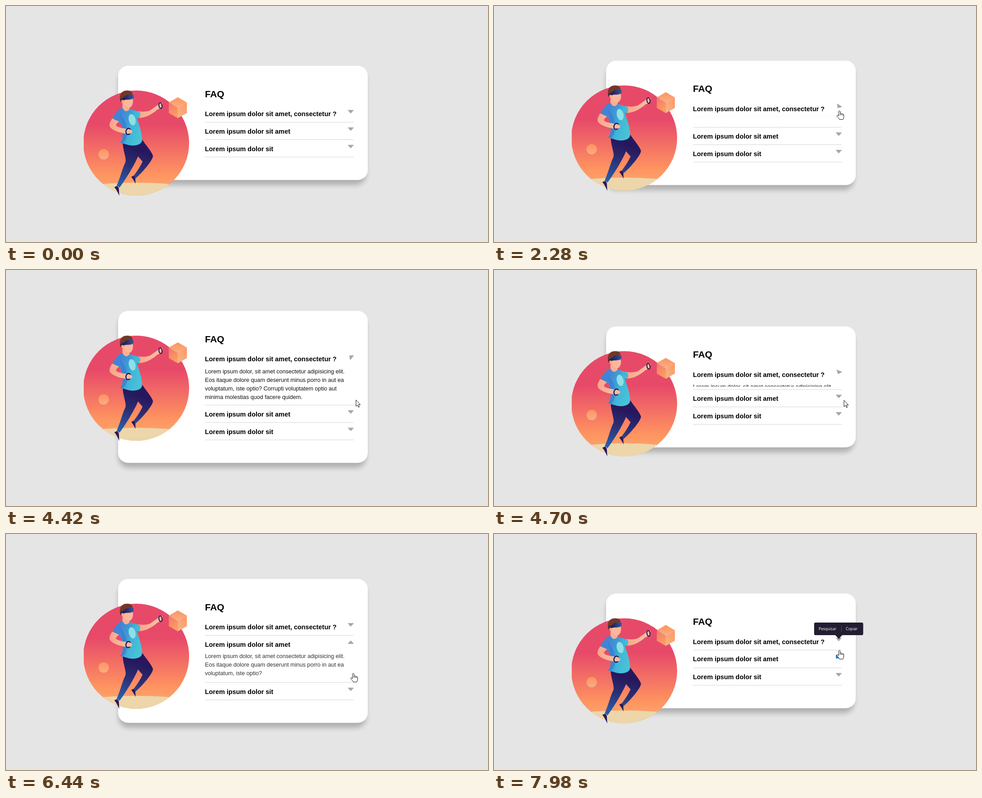
Recreate the animation shown at these times as an HTML page. Size 1066 by 525 pixels, loop 8000 ms.

```html
<!DOCTYPE html>
<html lang="en">
<head>
<meta charset="utf-8">
<title>FAQ card</title>
<style>
html, body { margin: 0; width: 100%; height: 100%; overflow: hidden; background: #e5e5e5; }
svg { display: block; width: 100%; height: 100%; }
text { font-family: "Liberation Sans", Arial, sans-serif; }
.head { font-size: 20.8px; font-weight: 700; }
.title { font-size: 14.4px; font-weight: 700; }
.answer { font-size: 12.6px; fill: #111; }
.tip text { font-family: "Open Sans", "Noto Sans", sans-serif; font-size: 8.6px; fill: #fff; }
.caret { fill: #a7a7a7; stroke: #a7a7a7; stroke-linejoin: round; }
.cursor { fill: #fff; stroke: #111; stroke-linejoin: round; }
</style>
</head>
<body>
<svg viewBox="0 0 1066 525">
  <defs>
    <linearGradient id="sky" x1="0" y1="0" x2="0" y2="1">
      <stop offset=".33" stop-color="#e74a69"/><stop offset=".8" stop-color="#ff9560"/><stop offset="1" stop-color="#f8ad78"/>
    </linearGradient>
    <linearGradient id="shirt" gradientUnits="userSpaceOnUse" x1="246" y1="262" x2="298" y2="276">
      <stop offset="0" stop-color="#4283d3"/><stop offset=".42" stop-color="#3e9ed5"/><stop offset=".6" stop-color="#3fb5d8"/><stop offset="1" stop-color="#48c2d7"/>
    </linearGradient>
    <linearGradient id="pants" gradientUnits="userSpaceOnUse" x1="290" y1="310" x2="258" y2="398">
      <stop offset=".1" stop-color="#27185d"/><stop offset=".5" stop-color="#2b2f73"/><stop offset="1" stop-color="#2a5ca9"/>
    </linearGradient>
    <linearGradient id="skin" x1="0" y1="0" x2="1" y2="0">
      <stop offset="0" stop-color="#fba589"/><stop offset="1" stop-color="#f9c4a5"/>
    </linearGradient>
    <linearGradient id="visor" x1="0" y1="0" x2="1" y2="0">
      <stop offset="0" stop-color="#29245f"/><stop offset="1" stop-color="#3058a2"/>
    </linearGradient>
    <linearGradient id="left" x1="0" y1="0" x2=".4" y2="1">
      <stop offset="0" stop-color="#ec786b"/><stop offset="1" stop-color="#ff9d60"/>
    </linearGradient>
    <linearGradient id="right" x1="1" y1="0" x2="0" y2="1">
      <stop offset="0" stop-color="#ff965f"/><stop offset="1" stop-color="#f6b58a"/>
    </linearGradient>
    <linearGradient id="top" x1="0" y1="0" x2="0" y2="1">
      <stop offset="0" stop-color="#ff945f"/><stop offset="1" stop-color="#f7ae85"/>
    </linearGradient>
    <clipPath id="disc"><circle cx="288" cy="305" r="117"/></clipPath>
    <clipPath id="edge"><rect x="172" y="180" width="260" height="250"/></clipPath>
    <filter id="blur" filterUnits="userSpaceOnUse" x="190" y="40" width="670" height="470"><feGaussianBlur stdDeviation="6"/></filter>
  </defs>

  <rect width="1066" height="525" fill="#e5e5e5"/>
  <rect id="shade" x="249" width="547" rx="22" opacity=".23" filter="url(#blur)"/>
  <rect id="card" x="248" width="552" rx="22" fill="#fff"/>

  <g id="art">
    <g clip-path="url(#edge)">
      <circle cx="288" cy="305" r="117" fill="url(#sky)"/>
      <ellipse cx="288" cy="420" rx="160" ry="27" fill="#ecd6aa" clip-path="url(#disc)"/>
    </g>
    <circle cx="216" cy="330" r="11.5" fill="url(#top)"/>
    <path d="M380 203L400 214.500 380 226 360 214.500Z" fill="url(#top)"/>
    <path d="M360 214.500L380 226V249.500L360 238Z" fill="url(#left)"/>
    <path d="M400 214.500L380 226V249.500L400 238Z" fill="url(#right)"/>

    <!-- legs -->
    <path d="M289 303L301 297C309 309 321 322 325 333C326 342 301 371 287 383L281 379C290 369 299 353 302 346L289 331Z" fill="url(#pants)"/>
    <path d="M258 303L299 300C299 314 295 328 290 339C281 359 262 390 251 404L245 399C252 384 258 359 264 348C267 338 259 325 258 303Z" fill="url(#pants)"/>
    <path d="M239.500 403L246 400 249.500 405 250.500 422C248 417 245 409 239.500 403ZM277 380L282 377.500 286 382 286.500 395.500C284 390 281 385 277 380Z" fill="#27185d"/>

    <!-- far arm -->
    <path d="M291 234C303 236 313 235 319 232L336 220C339 216 344 213 346 217L346 223C343 228 338 228 334 231C323 241 308 249 294 249Z" fill="url(#skin)"/>
    <ellipse cx="341.700" cy="221.500" rx="3.400" ry="6.400" fill="none" stroke="#27185d" stroke-width="2.200" transform="rotate(-10 342 222)"/>

    <!-- torso -->
    <path d="M258 214L257 232Q265 239 273 230L274 220Z" fill="#faae94"/>
    <path d="M258 227Q264 240 274 229L296 236Q298 243 295 250L289 248C295 267 302 285 301 299C300 306 293 310 280 310.500C270 310 264 307 252 304Q259 298 258 284L256 263 235 251C240 241 248 228 258 227Z" fill="url(#shirt)"/>
    <path d="M252 241C262 253 268 262 268 284C267 296 262 303 257 305L252 304Q259 298 258 284L256 263Z" fill="#387bce" opacity=".65"/>
    <ellipse cx="279" cy="253" rx="7.500" ry="12.800" fill="#8de0e5" transform="rotate(-13 279 253)"/>

    <!-- near arm -->
    <path d="M235 250L250 257C245 261 242 264 244 267C250 271 260 272 267 273Q275 272 278 278Q277 285 269 285C253 282 236 278 230 269C227 264 231 256 235 250Z" fill="url(#skin)"/>
    <ellipse cx="270.500" cy="279" rx="5.200" ry="6.800" fill="none" stroke="#27185d" stroke-width="2.600" transform="rotate(15 270.500 279)"/>
    <path d="M270 277Q274 272 278 277T274 284Q270 283 270 277Z" fill="#fab99c"/>

    <!-- head -->
    <path d="M257 205L279 201 281 211Q281 222 274 226Q266 228 260 217Z" fill="#fbb79b"/>
    <path d="M253 213C249 200 254 187 269 188Q279 188 280 196L268 199 261 208 256 212Z" fill="#6f3928"/>
    <path d="M253 207L264 201 266 208 257 211 255 214Z" fill="#27205c"/>
    <path d="M264 199L280 196.500Q283 198 282 205Q277 209 265 208.500Z" fill="url(#visor)"/>
    <path d="M255 210Q259 207 260 211T258 217Q255 215 255 210Z" fill="#fba589"/>
  </g>

  <text id="head" class="head" x="440">FAQ</text>
  <g id="items"></g>

  <g id="tip" class="tip">
    <path fill="#231d32" d="M711 197H813.500a3 3 0 0 1 3 3V222a3 3 0 0 1-3 3H770L762.500 233.500 755 225H711a3 3 0 0 1-3-3V200a3 3 0 0 1 3-3Z"/>
    <text x="718" y="214">Pesquisar</text>
    <text x="778" y="214">Copiar</text>
    <path d="M768.500 205.500V217" stroke="#5b556a"/>
  </g>

  <circle id="press" r="11" fill="#ffff75" style="mix-blend-mode:multiply"/>
  <path id="hand" class="cursor" d="M-2.700 1Q-1-1.800.7 1V6.200Q2.500 4.500 3.600 6.600Q5.500 5.300 6.300 7.600Q8.600 7 8.600 9.500V13Q8.300 16 6.800 19.300H-.8Q-2 16.500-6 12.300Q-7.500 10-5.600 9.400Q-4 9.300-2.700 11.500ZM.7 6V10M3.600 7V10M6.300 8V10"/>
  <path id="arrow" class="cursor" d="M0 0V14.300L3.200 11.400 5.500 16.500 7.600 15.600 5.400 10.600H9.800Z"/>
</svg>
<script>
const LOOP = 8000, PITCH = 38.75, OPEN_MS = 700, FADE_MS = 1000, MAX_H = 130;
const $ = id => document.getElementById(id);

function make(tag, parent, attrs, text) {
  const el = document.createElementNS("http://www.w3.org/2000/svg", tag);
  set(el, attrs);
  if (text) el.textContent = text;
  parent.append(el);
  return el;
}
function set(el, attrs) {
  for (const k in attrs) el.setAttribute(k, attrs[k]);
}
const show = (el, on) => set(el, { visibility: on ? "visible" : "hidden" });
const clamp = v => Math.max(0, Math.min(1, v));

function bezier(x1, y1, x2, y2) {
  const at = (a, b, s) => 3 * a * s * (1 - s) ** 2 + 3 * b * s * s * (1 - s) + s ** 3;
  return x => {
    x = clamp(x);
    let lo = 0, hi = 1;
    for (let i = 0; i < 24; i++) {
      const mid = (lo + hi) / 2;
      if (at(x1, x2, mid) < x) lo = mid; else hi = mid;
    }
    return at(y1, y2, (lo + hi) / 2);
  };
}
const ease = bezier(.25, .1, .25, 1);
const easeInOut = bezier(.42, 0, .58, 1);

const lines = [
  "Lorem ipsum dolor, sit amet consectetur adipisicing elit.",
  "Eos itaque dolore quam deserunt minus porro in aut ea",
  "voluptatum, iste optio? Corrupti voluptatem optio aut",
  "minima molestias quod facere quidem."
];
const items = [
  { title: "Lorem ipsum dolor sit amet, consectetur ?", lines, full: 84, open: 2180, close: 4280 },
  { title: "Lorem ipsum dolor sit amet", lines: [lines[0], lines[1], "voluptatum, iste optio?"], full: 66, open: 5700, close: 7360 },
  { title: "Lorem ipsum dolor sit", lines: [], full: 0, open: LOOP, close: LOOP }
];
items.forEach((it, i) => {
  const g = it.g = make("g", $("items"), {});
  make("text", g, { class: "title", x: 440, y: 245 }, it.title);
  const clip = make("clipPath", g, { id: "clip" + i });
  it.clip = make("rect", clip, { x: 436, y: 252, width: 340 });
  const box = make("g", g, { "clip-path": `url(#clip${i})` });
  it.text = make("g", box, {});
  it.lines.forEach((s, n) => make("text", it.text, { class: "answer", x: 440, y: 271.5 + 19 * n }, s));
  it.line = make("path", g, { d: "M440 258.500H769", stroke: "#d4d4d4" });
  it.mark = make("rect", g, { x: 756, y: 230.5, width: 13, height: 8, fill: "#2f7fd6" });
  it.caret = make("path", g, { class: "caret", d: "M-6-3.200H6L0 3.600Z" });
});

// time, x, y
const path = [
  [240, 967, 478], [310, 962, 463], [770, 962, 463], [1480, 764, 203], [1610, 764, 225], [1680, 765, 233],
  [2180, 765, 233], [2840, 766, 237], [3190, 766, 247], [3320, 766, 247], [3880, 761, 199], [4200, 761, 199],
  [4420, 774, 289], [4840, 774, 290], [5330, 756, 278], [5700, 756, 278], [6300, 769, 310], [6460, 769, 310],
  [7140, 763, 236], [7380, 763, 236], [7980, 765, 259], [8000, 765, 259]
];
const presses = [[2010, 2170], [4080, 4240], [5530, 5690], [7210, 7350]];

function pointer(t) {
  const i = Math.max(1, path.findIndex(p => p[0] > t));
  const [a, b] = [path[i - 1], path[i]];
  const u = clamp((t - a[0]) / (b[0] - a[0])), s = u * u * (3 - 2 * u);
  return [a[1] + (b[1] - a[1]) * s, a[2] + (b[2] - a[2]) * s];
}

function draw(t) {
  for (const it of items) {
    it.p = ease((t - it.open) / OPEN_MS) - ease((t - it.close) / OPEN_MS);
    it.h = Math.min(it.full, MAX_H * it.p);
  }
  const total = items.reduce((sum, it) => sum + it.h, 0);
  const up = -total / 2, selected = t >= 7800;

  set($("card"), { y: 133 + up, height: 254 + total });
  set($("shade"), { y: 144 + up, height: 254 + total });
  set($("art"), { transform: `translate(0 ${up})` });
  set($("head"), { y: 202.5 + up });

  let y = up;
  items.forEach((it, i) => {
    const fade = easeInOut((t - it.open) / FADE_MS);
    set(it.g, { transform: `translate(0 ${y})` });
    set(it.clip, { height: it.h });
    set(it.text, { opacity: fade, transform: `translate(0 ${-10 * (1 - fade)})` });
    set(it.line, { transform: `translate(0 ${it.h})` });
    set(it.caret, { transform: `translate(762.5 235) rotate(${180 * it.p})` });
    show(it.mark, selected && i === 1);
    show(it.caret, !(selected && i === 1));
    y += PITCH + it.h;
  });
  show($("tip"), selected);

  const [px, py] = pointer(t);
  const over = px < 769.5 && py > 222 + up && py < 336 - up;
  const place = { transform: `translate(${px} ${py})` };
  for (const id of ["hand", "arrow", "press"]) set($(id), place);
  show($("hand"), t >= 240 && over);
  show($("arrow"), t >= 240 && !over);
  show($("press"), presses.some(([a, b]) => t >= a && t < b));
}

const start = performance.now();
function tick(now) {
  draw(Math.max(0, now - start) % LOOP);
  requestAnimationFrame(tick);
}
draw(0);
requestAnimationFrame(tick);
</script>
</body>
</html>
```
